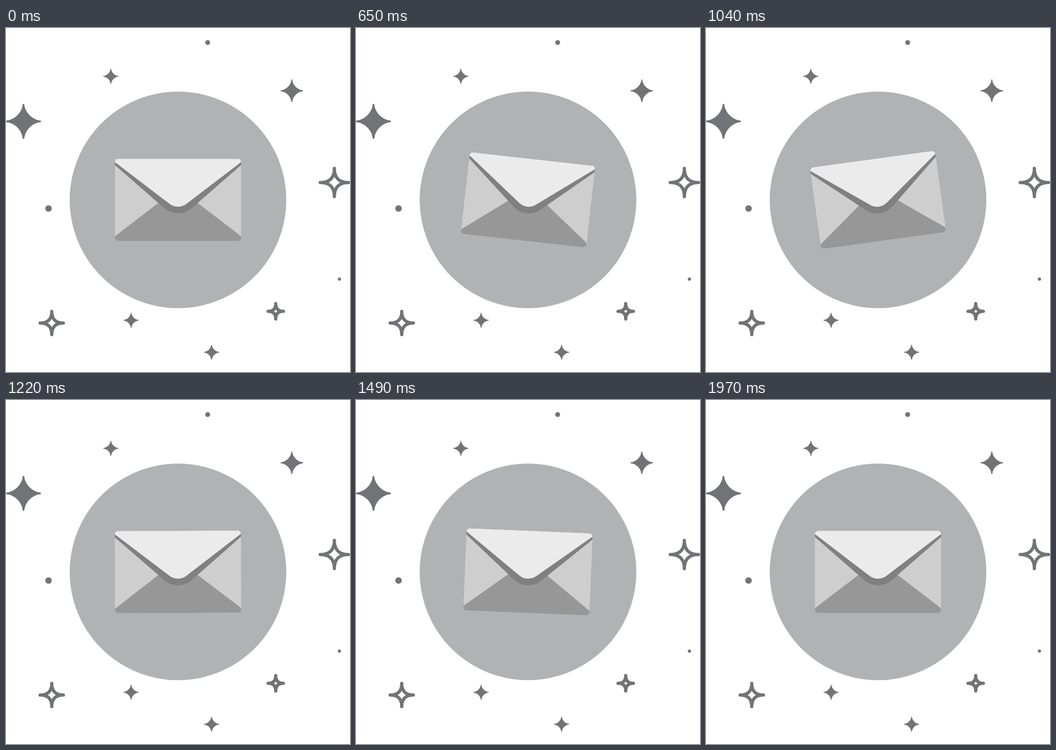
An HTML page with a canvas for the animation above (2500 ms loop, 748 px wide and 748 px high).

```html
<!DOCTYPE html>
<html lang="en">
<head>
<meta charset="utf-8">
<title>Wiggling envelope</title>
<style>
  html, body { margin: 0; width: 100%; height: 100%; overflow: hidden; background: #fff; }
  canvas { display: block; width: 748px; height: 748px; }
</style>
</head>
<body>
<canvas id="stage" width="748" height="748"></canvas>
<script>
const ctx = document.getElementById('stage').getContext('2d');
const SIZE = 748, MID = SIZE / 2;
const LOOP = 2500, START = 470, STEP = 30;
const SWINGS = 5, SPAN = 10.05, TILT = 10;
const W = 137.3, H = 89.4;
const INK = '#727377';

// x, y, radius
const solidStars = [[38, 203, 38], [621.5, 136.5, 24.5], [228, 105, 16.5], [272, 635.5, 16.5], [447, 705, 16.5]];
const hollowStars = [[714, 336, 34.3], [99.5, 641.5, 28.8], [586.5, 616, 20.2]];
const dots = [[438.5, 31.5, 5.3], [92.5, 392.5, 7.1], [725, 546, 3.5]];

// Rest at both ends, alternating tilts between
const tilt = k => k % SWINGS === 0 ? 0 : k % 2 ? TILT : -TILT;

function angleAt(ms) {
  const step = Math.floor((ms - START) / STEP);
  if (step < 0 || step >= 50) return 0;
  const k = Math.floor(step / SPAN);
  const from = k ? k * SPAN : -1;
  const part = (step - from) / ((k + 1) * SPAN - from);
  return tilt(k) + (tilt(k + 1) - tilt(k)) * part;
}

function disc(x, y, r, color) {
  ctx.fillStyle = color;
  ctx.beginPath();
  ctx.arc(x, y, r, 0, Math.PI * 2);
  ctx.fill();
}

// Four-pointed superellipse; the round stroke softens its tips
function star(x, y, r, line, power, filled) {
  const reach = r - line / 2;
  const bend = v => Math.sign(v) * Math.abs(v) ** power * reach;
  ctx.beginPath();
  for (let i = 0; i < 128; i++) {
    const a = i * Math.PI / 64;
    ctx.lineTo(x + bend(Math.cos(a)), y + bend(Math.sin(a)));
  }
  ctx.closePath();
  ctx.fillStyle = ctx.strokeStyle = INK;
  ctx.lineWidth = line;
  ctx.lineJoin = 'round';
  ctx.stroke();
  if (filled) ctx.fill();
}

// V shape with a rounded tip, hanging from the top edge
function flap(side, tip, radius, color) {
  ctx.beginPath();
  ctx.moveTo(-W, -H);
  ctx.lineTo(-W, side);
  ctx.arcTo(0, tip, W, side, radius);
  ctx.lineTo(W, side);
  ctx.lineTo(W, -H);
  ctx.fillStyle = color;
  ctx.fill();
}

function envelope(deg) {
  ctx.save();
  ctx.translate(MID, MID - 0.3);
  ctx.rotate(deg * Math.PI / 180);
  ctx.beginPath();
  ctx.roundRect(-W, -H, 2 * W, 2 * H, 7.5);
  ctx.clip();
  ctx.fillStyle = '#cecece';
  ctx.fillRect(-W, -H, 2 * W, 2 * H);

  ctx.fillStyle = '#979797';
  ctx.beginPath();
  ctx.moveTo(-W, H);
  ctx.lineTo(-W, 79.4);
  ctx.lineTo(0, -26);
  ctx.lineTo(W, 79.4);
  ctx.lineTo(W, H);
  ctx.fill();

  flap(-75.8, 44, 45, '#808080');
  flap(-82.3, 22.6, 30, '#ebebeb');
  ctx.restore();
}

function draw(ms) {
  ctx.fillStyle = '#fff';
  ctx.fillRect(0, 0, SIZE, SIZE);
  disc(MID, MID - 0.2, 235.5, '#b1b2b4');
  for (const [x, y, r] of solidStars) star(x, y, r, r * 0.11, 3.2, true);
  for (const [x, y, r] of hollowStars) star(x, y, r, 7, 4, false);
  for (const [x, y, r] of dots) disc(x, y, r, INK);
  envelope(angleAt(ms));
}

const t0 = performance.now();
function tick() {
  draw((performance.now() - t0) % LOOP);
  requestAnimationFrame(tick);
}
tick();
</script>
</body>
</html>
```
